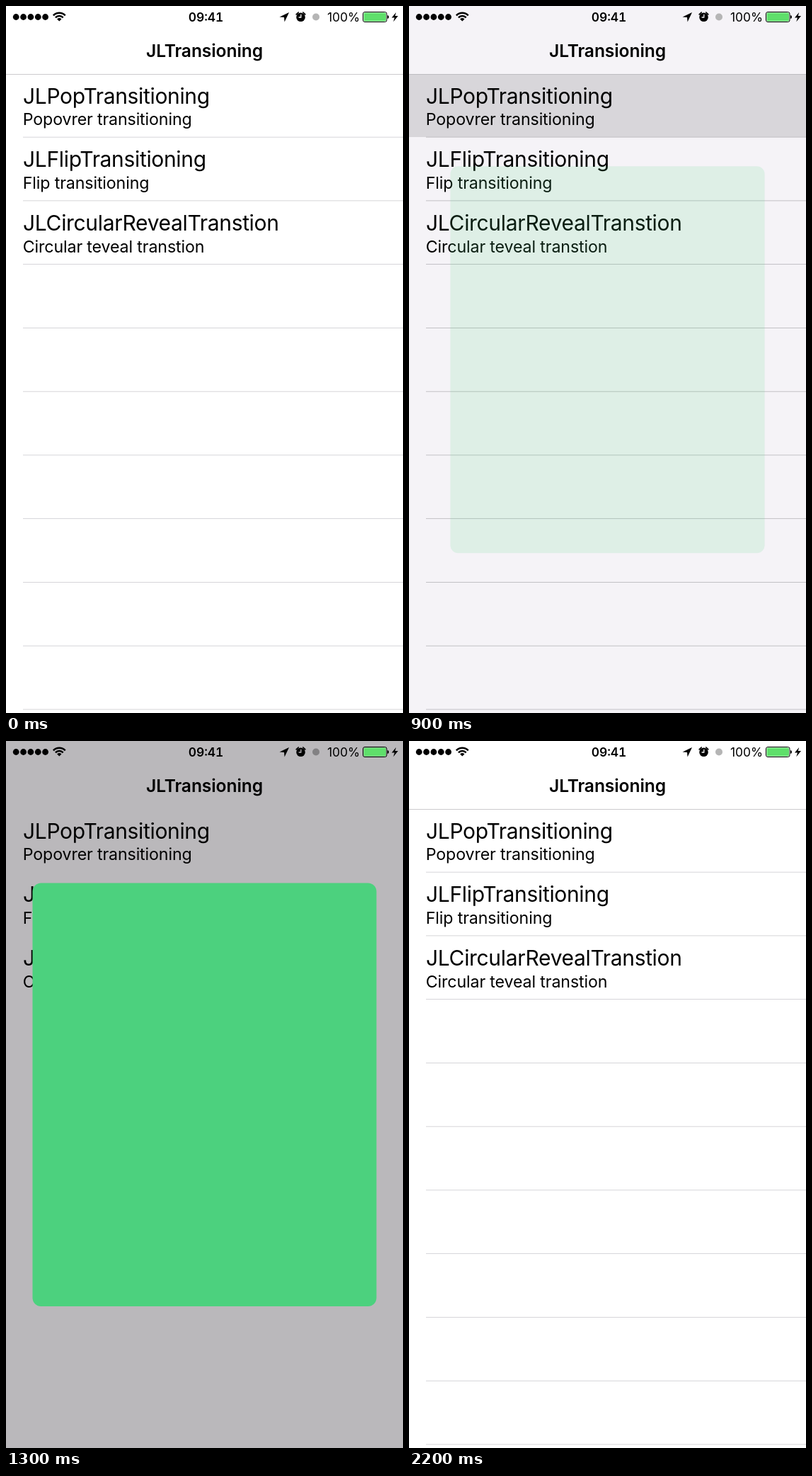
These frames come from a looping animation (561 by 998 pixels, 2.4 s). An HTML page:

```html
<!DOCTYPE html>
<html lang="en">
<head>
<meta charset="utf-8">
<title>Pop transition</title>
<style>
  html, body { margin: 0; width: 100%; height: 100%; overflow: hidden; background: #fff; }
  svg { display: block; width: 100%; height: 100%; }
  text { font-family: Inter, Roboto, "Liberation Sans", sans-serif; fill: #000; }
  .name { font-size: 30px; letter-spacing: -0.34px; }
  .note { font-size: 23.2px; letter-spacing: -0.13px; }
  .title { font-size: 24.6px; font-weight: 600; letter-spacing: -0.1px; text-anchor: middle; }
  .clock { font-size: 17.4px; font-weight: 600; font-variant-numeric: tabular-nums; text-anchor: middle; }
  .charge { font-size: 17.4px; }
</style>
</head>
<body>
<svg id="stage" viewBox="0 0 561 998" preserveAspectRatio="none">
  <rect width="561" height="998" fill="var(--back)"/>
  <rect id="highlight" y="97" width="561" height="88" fill="#d8d6da"/>
  <rect id="navLine" y="96" width="561" height="1"/>
  <g id="lines"></g>
  <g id="rows"></g>
  <text class="title" x="280.5" y="72">JLTransioning</text>

  <g id="dots"></g>
  <g id="wifi" fill="none" stroke="#000" stroke-width="2.5"></g>
  <text class="clock" x="282.5" y="22">09:41</text>
  <path d="M400 9L386.5 15.6L393 16.1L393.6 22.5Z"/>
  <circle cx="416.5" cy="15.7" r="6.3"/>
  <path d="M410.2 11.8L413.2 9M419.8 9L422.8 11.8" stroke="#000" stroke-width="1.7" stroke-linecap="round"/>
  <path d="M416.8 11.8V16H413.6" fill="none" stroke="var(--back)" stroke-width="1.3"/>
  <circle id="badge" cx="438" cy="15.5" r="5"/>
  <text class="charge" x="454" y="22">100%</text>
  <rect x="504.5" y="8.5" width="33.5" height="14" rx="2.5" fill="none" stroke="#000"/>
  <rect x="505.6" y="9.6" width="31.3" height="11.8" rx="1.5" fill="#5fdf6b"/>
  <path d="M539 13Q541 13.4 541 15.5T539 18Z"/>
  <path d="M551.2 9L545 16.5H549L547.3 22.3L554 14H549.8Z"/>

  <rect id="panel" x="37.5" y="200.5" width="486" height="597.5" rx="12" fill="#4cd17e"/>
</svg>
<script>
  const LOOP = 2400, STEP = 100;
  const PX = 0.748; // stage pixels per device pixel
  const ROW = 120 * PX;
  const NS = 'http://www.w3.org/2000/svg';
  const $ = id => document.getElementById(id);

  function add(parent, tag, attrs, label) {
    const el = document.createElementNS(NS, tag);
    set(el, attrs);
    if (label) el.textContent = label;
    $(parent).appendChild(el);
  }

  function set(el, attrs) {
    for (const key in attrs) el.setAttribute(key, attrs[key]);
  }

  [
    ['JLPopTransitioning', 'Popovrer transitioning'],
    ['JLFlipTransitioning', 'Flip transitioning'],
    ['JLCircularRevealTranstion', 'Circular teveal transtion']
  ].forEach(([name, note], i) => {
    add('rows', 'text', { class: 'name', x: 24, y: 137.7 + i * ROW }, name);
    add('rows', 'text', { class: 'note', x: 23.8, y: 168.4 + i * ROW }, note);
  });

  for (let i = 0; i < 10; i++) {
    add('lines', 'rect', { x: 24, y: 247 * PX + i * ROW, width: 537, height: PX });
  }
  for (let i = 0; i < 5; i++) {
    add('dots', 'circle', { cx: 14.2 + i * 10.35, cy: 15.5, r: 4.4 });
  }

  // Wi-Fi bands fan out from one point
  function fan(r) {
    const dx = r * 0.72, y = 21.5 - r * 0.69;
    return `M${75.3 - dx} ${y}A${r} ${r} 0 0 1 ${75.3 + dx} ${y}`;
  }
  add('wifi', 'path', { d: fan(11.7) });
  add('wifi', 'path', { d: fan(7.5) });
  add('wifi', 'path', { d: fan(4.4) + 'L75.3 21.5Z', fill: '#000', stroke: 'none' });

  // Start time, presentation progress (0 = list only, 1 = panel shown), backdrop
  const CLEAR = '#fff', FAINT = '#f5f3f7', DIMMED = '#bab8bb';
  const stops = [
    [0, 0, CLEAR], [900, 0.138, FAINT], [1000, 0.985, DIMMED],
    [1100, 1, DIMMED], [1600, 0.138, FAINT], [1700, 0, CLEAR]
  ];

  function draw(time) {
    const t = Math.floor((time % LOOP) / STEP) * STEP;
    const [, p, back] = stops.filter(s => s[0] <= t).pop();
    const scale = 0.9 + 0.1 * p;
    const covered = p > 0.5;

    $('stage').style.setProperty('--back', back);
    set($('panel'), {
      opacity: p,
      transform: `translate(280.5 499.25) scale(${scale}) translate(-280.5 -499.25)`
    });
    set($('highlight'), { opacity: t === 900 ? 1 : 0 });
    set($('lines'), { opacity: covered ? 0 : 1, fill: p ? '#b2b1b5' : '#c8c7cc' });
    set($('navLine'), { opacity: p < 1 ? 1 : 0, fill: covered ? '#8f8d90' : p ? '#bebdc1' : '#cccbcd' });
    set($('badge'), { fill: covered ? '#828183' : '#b5b5b5' });
  }

  const start = performance.now();
  function tick() {
    draw(performance.now() - start);
    requestAnimationFrame(tick);
  }
  draw(0);
  requestAnimationFrame(tick);
</script>
</body>
</html>
```
